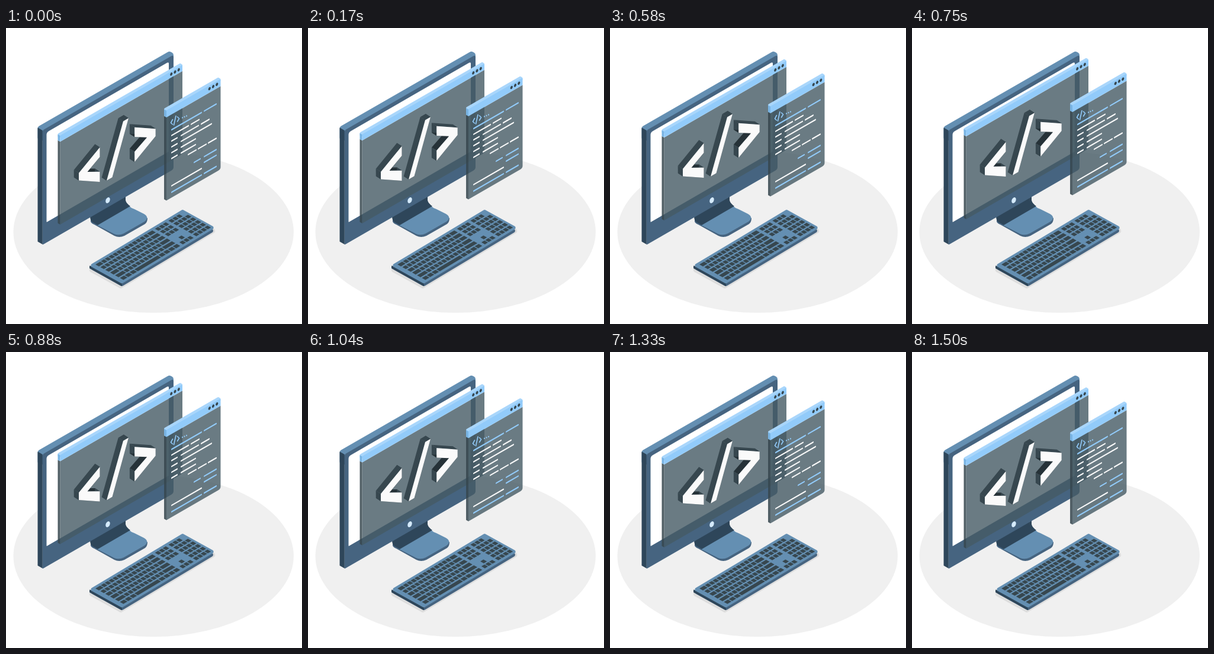
These frames come from a looping animation (500x500 px, 1540 ms). An HTML page with a canvas:

```html
<!DOCTYPE html>
<html lang="en">
<head>
<meta charset="utf-8">
<title>Floating code windows</title>
<style>
html, body { margin: 0; width: 100%; height: 100%; overflow: hidden; background: #fff; }
canvas { display: block; width: 100vw; height: 100vh; }
</style>
</head>
<body>
<canvas id="stage"></canvas>
<script>
const LOOP = 1540, STEPS = 37, LIFT = 9, SLOPE = 0.577;
const DARK = '#37474f', DEEP = '#263238', WHITE = '#fafafa', SKY = '#92cbfa';
const STEEL = '#648fb2', FRONT = '#466480', SIDE = '#2e465a';

const canvas = document.getElementById('stage');
const ctx = canvas.getContext('2d');
const ratio = window.devicePixelRatio || 1;
canvas.width = canvas.height = 500 * ratio;

// Polygon from [x, y] points, with optional rounded corners.
function shape(color, points, r = 0) {
  const n = points.length;
  ctx.beginPath();
  if (r) {
    const [[x0, y0], [x1, y1]] = points;
    ctx.moveTo((x0 + x1) / 2, (y0 + y1) / 2);
    for (let i = 1; i <= n; i++) ctx.arcTo(...points[i % n], ...points[(i + 1) % n], r);
  } else {
    for (const p of points) ctx.lineTo(...p);
  }
  ctx.closePath();
  ctx.fillStyle = color;
  ctx.fill();
}

// Upright isometric rectangle facing right, from its top left corner.
function wall(color, x, y, w, h, radii = 0) {
  ctx.save();
  ctx.transform(1, -SLOPE, 0, 1, x, y);
  ctx.beginPath();
  ctx.roundRect(0, 0, w, h, radii);
  ctx.fillStyle = color;
  ctx.fill();
  ctx.restore();
}

// Narrow left face of a slab; x, y is its top right corner.
function edge(color, x, y, depth, h) {
  const drop = depth * SLOPE;
  shape(color, [[x - depth, y - drop], [x, y], [x, y + h], [x - depth, y + h - drop]]);
}

function oval(color, x, y, rx, ry, tilt = 0) {
  ctx.beginPath();
  ctx.ellipse(x, y, rx, ry, tilt, 0, Math.PI * 2);
  ctx.fillStyle = color;
  ctx.fill();
}

function area(color, path) {
  ctx.fillStyle = color;
  ctx.fill(new Path2D(path));
}

function drawMonitor() {
  area(FRONT, 'M143 322 V327 Q144 330 149 332 L183 351 Q191 355 200 351 L235 331 Q239 328 239 321 L200 310 Z');
  area(STEEL, 'M154 333 L207 300 Q211 304 217 306 L233 314 Q243 320 234 327 L199 347 Q191 351 183 348 Z');
  area(SIDE, 'M142 318 L202 284 V291 Q203 296 210 301 L155 333 L146 328 Q142 325 142 318 Z');

  shape(STEEL, [[53.5, 167], [276, 39], [283, 43], [283, 80], [62, 190], [53.5, 190]], 5);
  wall(FRONT, 61.5, 173, 221.5, 193.5, [3, 4, 4, 2]);
  edge(SIDE, 61.7, 173, 8.2, 192.5);
  wall('#fff', 68.5, 176.2, 206.5, 151.8, [4, 3, 0, 1]);
  oval('#d5ebfd', 172, 291, 3.4, 5.2, 0.42);
}

// Point on the keyboard: u runs along its length, v across it, z is downwards.
const board = (u, v, z = 0) => [141 + 157 * u + 55 * v, 401 - 94 * u + 30.5 * v + z];

function slab(color, u0, v0, u1, v1, r = 0, z = 0) {
  shape(color, [board(u0, v0, z), board(u1, v0, z), board(u1, v1, z), board(u0, v1, z)], r);
}

function drawKeyboard() {
  slab('#dddddd', -0.02, -0.02, 1.02, 1.02, 4, 6.5);
  slab(FRONT, 0, 0, 1, 1, 3, 5);
  shape(SIDE, [board(0, 0), board(0, 1), board(0, 1, 5), board(0, 0, 5)], 1);
  slab(STEEL, -0.003, -0.003, 1.003, 1.003, 3);

  const unit = 0.0413, ones = n => Array(n).fill(1);
  const keys = (u, row, widths) => {
    const v = 0.07 + row * 0.15;
    for (const w of widths) {
      slab(DARK, u, v, u + w * unit - 0.008, v + 0.108);
      u += w * unit;
    }
  };
  for (let row = 0; row < 6; row++) {
    const lead = 1 + 0.4 * Math.abs(row - 1);
    const middle = Math.min(12, 14 - row);
    const bottom = Array.from({ length: 8 }, (_, i) => i === 3 ? 6.25 : 1.25);
    keys(0.04, row, row === 5 ? bottom : [lead, ...ones(middle), 15 - lead - middle]);
    if (row < 3 || row === 5) keys(0.68, row, ones(3));
    keys(0.825, row, ones(row ? 4 : 3));
  }
  keys(0.68 + unit, 4, [1]);
}

function drawWindow(x, y, w, bar, h) {
  const rise = w * SLOPE;
  edge('rgba(55,71,79,.86)', x, y + bar, 4, h - bar);
  wall('rgba(69,90,100,.8)', x, y + bar, w, h - bar, [0, 0, 4, 0]);
  shape('#a9d6fb', [[x - 4, y - 2.3], [x + w - 4, y - rise - 2.3], [x + w, y - rise], [x + w, y - rise + 4], [x, y + 4], [x - 4, y + 4]], 2);
  edge('#79b4e3', x, y + 1, 4, bar - 1);
  wall(SKY, x, y + 0.5, w, bar - 0.5, [1, 2, 0, 0]);
  for (let i = 1; i <= 3; i++) {
    const dx = w - 6.25 * i;
    oval(DARK, x + dx, y - dx * SLOPE + bar / 2 - 0.3, 1.8, 2.9, 0.4);
  }
}

// White face with its sides pushed back; the two edges at the inner corner are darkest.
function extrude(face, inner) {
  const back = ([x, y]) => [x - 8.3, y - 5.3];
  face.forEach((a, i) => {
    const j = (i + 1) % face.length, b = face[j];
    shape(i === inner || j === inner ? DEEP : DARK, [a, b, back(b), back(a)]);
  });
  shape(WHITE, face);
}

function drawGlyphs() {
  const iso = (x, y) => [x, 251.3 + y - (x - 123) * SLOPE];
  const chevron = (tip, dir) => {
    const outline = [[35.5, -29.3], [35.5, -13], [14.5, 0], [35.5, 12], [35.5, 29.3], [0, 6.3], [0, -6.3]];
    extrude(outline.map(([x, y]) => iso(tip + dir * x, y)), 2);
  };
  chevron(123, 1);
  extrude([iso(198, -50.5), iso(207, -50.5), iso(179.5, 33.5), iso(170, 33.5)]);
  chevron(252.7, -1);
}

function drawCode() {
  const LEFT = 279, MID = 331, TAB = 334, RIGHT = 356;
  const dash = (color, y, a, b) => wall(color, a, y - 1.2 - (a - LEFT) * SLOPE, b - a, 2.4, 1);
  const split = (color, y) => {
    dash(color, y, LEFT, MID);
    dash(color, y, TAB, RIGHT);
  };

  split(SKY, 172.4);
  dash(WHITE, 182, LEFT, 309);
  dash(WHITE, 182, 312, 327);
  [326, 348, 321, 321].forEach((end, i) => {
    const y = 191.4 + i * 9.8;
    dash(WHITE, y, LEFT, 290);
    dash(WHITE, y, 295, end);
  });
  dash(WHITE, 191.4, 329, 344);
  for (const a of [307, 324, 341]) dash(WHITE, 230.4, a, a + 15);
  dash(SKY, 249.4, 317, 329);
  dash(SKY, 249.4, TAB, RIGHT);
  dash(SKY, 259, TAB, RIGHT);
  dash(WHITE, 267, LEFT, MID);
  split(SKY, 277.8);

  ctx.strokeStyle = SKY;
  ctx.lineWidth = 1.6;
  ctx.lineCap = 'round';
  ctx.stroke(new Path2D('M281.5 154.5 L278.5 160 L281.5 163 M287 148.5 L283.5 164 M289.5 150 L292.5 153 L289.5 158'));
  for (let i = 0; i < 3; i++) oval(SKY, 298 + i * 3.5, 151.5 - i * 1.5, 1, 1.3);
}

function draw(time) {
  const step = Math.floor(((time + 5) % LOOP) / (LOOP / STEPS));
  const lift = LIFT * (1 - Math.abs(step / 18 - 1));
  ctx.setTransform(ratio, 0, 0, ratio, 0, 0);
  ctx.clearRect(0, 0, 500, 500);
  oval('#f0f0f0', 249.2, 344.4, 236.7, 136.6);
  drawMonitor();
  drawKeyboard();
  ctx.translate(0, -lift);
  drawWindow(91.5, 181, 206.5, 11, 151);
  drawGlyphs();
  drawWindow(271, 138.5, 91.5, 12.5, 153);
  drawCode();
}

const start = performance.now();
function tick() {
  draw(performance.now() - start);
  requestAnimationFrame(tick);
}
tick();
</script>
</body>
</html>
```
